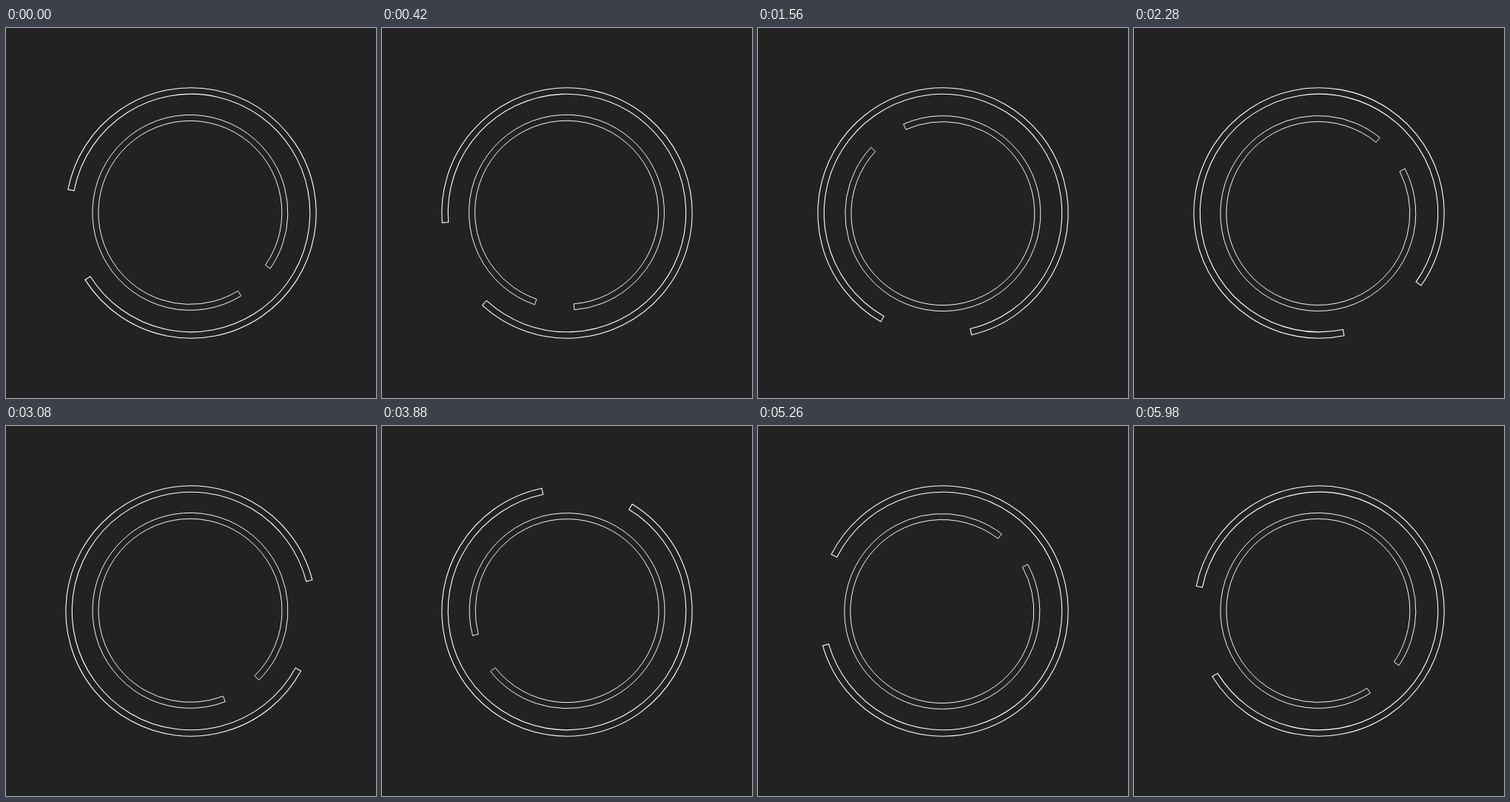
Write an HTML page with a canvas that moves like this. It is 500 px wide and 500 px high and loops after 6 s.

```html
<!DOCTYPE html>
<html lang="en">
<head>
<meta charset="utf-8">
<title>Ring loader</title>
<style>
html, body { margin: 0; width: 100%; height: 100%; overflow: hidden; background: #222; }
canvas { display: block; width: 500px; height: 500px; }
</style>
</head>
<body>
<canvas id="stage" width="500" height="500"></canvas>
<script>
const ctx = document.getElementById('stage').getContext('2d');
const LOOP = 6000, STEP = 20;
const rad = deg => deg * Math.PI / 180;

// Outer turn: seconds, degrees, degrees per second
const turn = [
  [0, 0, 33],
  [0.84, 33.2, 46],
  [2.28, 112.4, 56],
  [3.08, 162.2, 88],
  [3.88, 249.4, 106],
  [4.54, 311.1, 80],
  [6, 360, 33]
];

// Cubic Hermite through the keys
function follow(keys, t) {
  let i = 0;
  while (i < keys.length - 2 && t >= keys[i + 1][0]) i++;
  const [t0, a, va] = keys[i], [t1, b, vb] = keys[i + 1];
  const h = t1 - t0, u = (t - t0) / h, w = 1 - u;
  return a + (b - a) * u * u * (3 - 2 * u) + h * u * w * (va * w - vb * u);
}

// Outlined band, open around the angle `gap`
function band(x, y, rOut, rIn, gap, half, width) {
  const from = rad(gap + half), to = rad(gap - half + 360);
  ctx.beginPath();
  ctx.arc(x, y, rOut, from, to);
  ctx.arc(x, y, rIn, to, from, true);
  ctx.closePath();
  ctx.lineWidth = width;
  ctx.stroke();
}

function draw(ms) {
  ctx.fillStyle = '#222';
  ctx.fillRect(0, 0, 500, 500);
  ctx.strokeStyle = '#fff';
  band(250, 250, 169.2, 160.8, 169.3 - follow(turn, ms / 1000), 21.5, 1.1);

  // The inner ring sits slightly off its pivot
  const gap = 46.8 + 0.12026 * ms, g = rad(gap);
  band(249.4 - 0.8 * Math.cos(g), 250 - 0.8 * Math.sin(g), 132, 124, gap, 11.8, 0.95);
}

const start = performance.now();
function tick() {
  const t = (performance.now() - start) % LOOP;
  draw(Math.floor(t / STEP) * STEP);
  requestAnimationFrame(tick);
}
tick();
</script>
</body>
</html>
```
